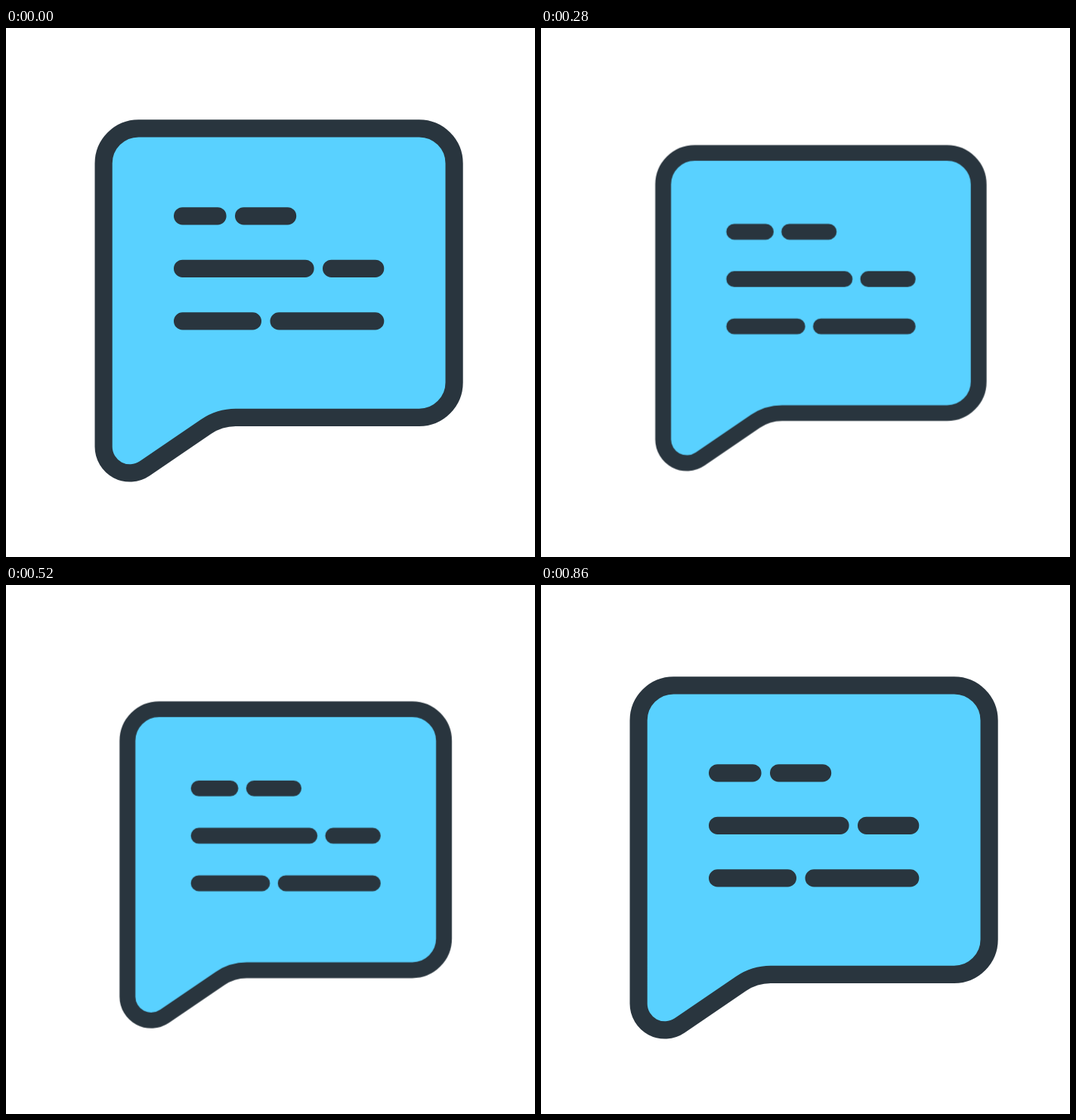
Write an HTML page that moves like this. It is 700x700 px and loops after 3000 ms.

```html
<!DOCTYPE html>
<html lang="en">
<head>
<meta charset="utf-8">
<title>Chat bubble</title>
<style>
  html, body { margin: 0; width: 100%; height: 100%; overflow: hidden; background: #fff; }
  svg { display: block; width: 100%; height: 100%; }
  #bubble {
    fill: none;
    stroke: #29353e;
    stroke-width: 23.2;
    stroke-linecap: round;
    stroke-linejoin: round;
    transform-origin: 453.6px 457px;
  }
  .body { fill: #59d1ff; }
</style>
</head>
<body>
<svg viewBox="0 0 700 700">
  <g id="bubble">
    <path class="body" d="M175.5 132.8 H546.7 A46.4 46.4 0 0 1 593.1 179.2 V469
      A46.4 46.4 0 0 1 546.7 515.4 H304 A69.6 69.6 0 0 0 264.9 527.4 L183.5 582.9
      A34.8 34.8 0 0 1 129.1 554.1 V179.2 A46.4 46.4 0 0 1 175.5 132.8 Z"/>
    <path d="M233.6 248.8 H280 M314.6 248.8 H372.6"/>
    <path d="M233.6 318.3 H396 M430.6 318.3 H488.7"/>
    <path d="M233.6 387.9 H326.4 M361.1 387.9 H488.7"/>
  </g>
</svg>
<script>
  const LOOP = 3000;
  const smooth = "cubic-bezier(0.3333, 0, 0.6667, 1)";

  // [time in ms, scale]
  const steps = [[0, 1], [20, 1], [380, 0.877], [860, 1], [LOOP, 1]];

  document.getElementById("bubble").animate(
    steps.map(([time, scale]) => ({
      offset: time / LOOP,
      transform: `scale(${scale})`,
      easing: smooth
    })),
    { duration: LOOP, iterations: Infinity }
  );
</script>
</body>
</html>
```
